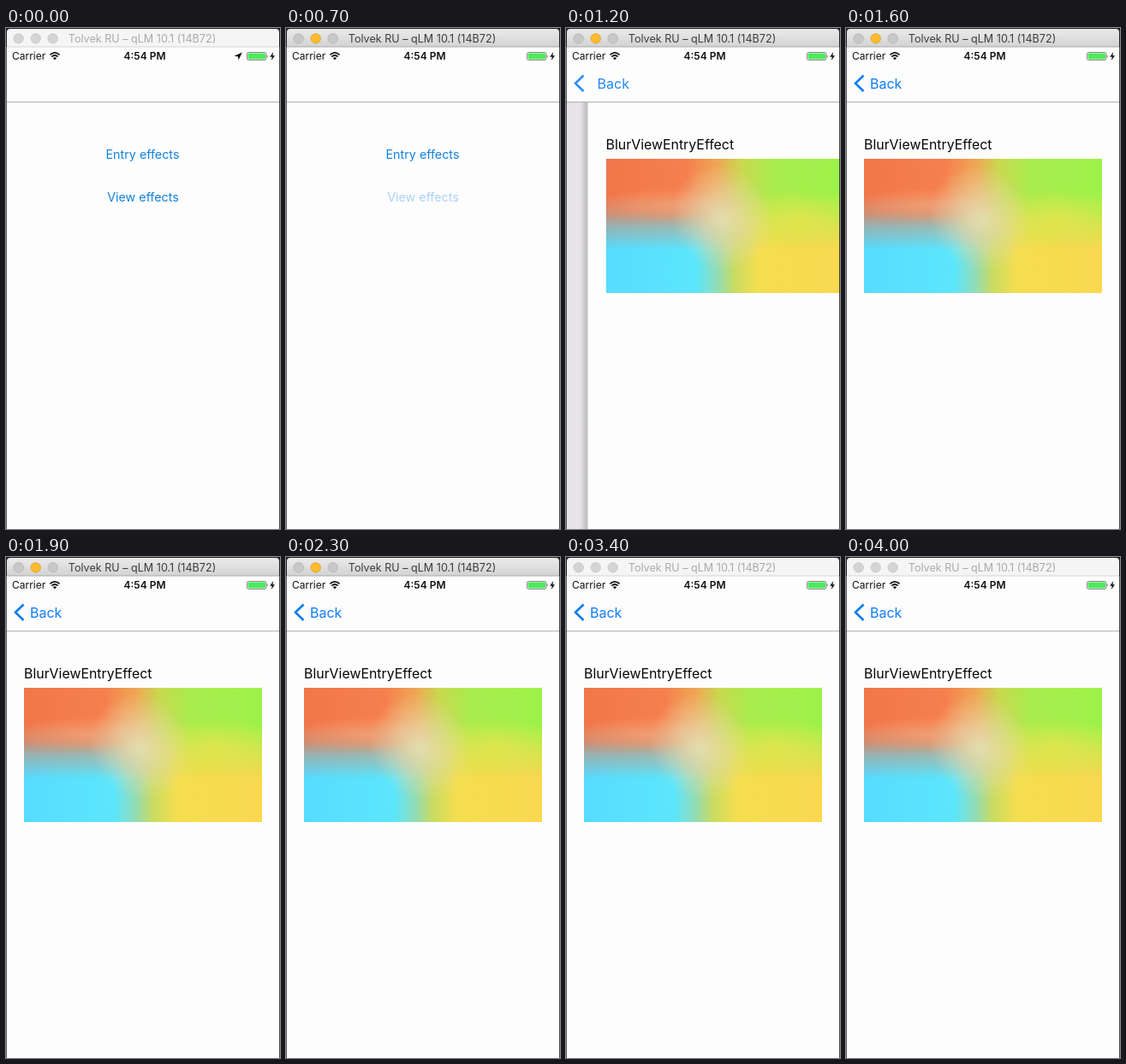
These frames come from a looping animation (320 px wide and 586 px high, 4100 ms). An HTML page:

```html
<!DOCTYPE html>
<html lang="en">
<head>
<meta charset="utf-8">
<title>Page push</title>
<style>
  html, body { margin: 0; width: 100%; height: 100%; overflow: hidden; background: #fff; }
  svg { display: block; width: 320px; height: 586px; font-family: Inter, Roboto, sans-serif; }
</style>
</head>
<body>
<svg viewBox="0 0 320 586">
  <defs>
    <linearGradient id="barOn" x2="0" y2="1"><stop stop-color="#ebebeb"/><stop offset="1" stop-color="#d2d2d2"/></linearGradient>
    <linearGradient id="upper">
      <stop stop-color="#f1764a"/><stop offset=".34" stop-color="#f5804e"/>
      <stop offset=".47" stop-color="#efa654"/><stop offset=".57" stop-color="#c9d950"/>
      <stop offset=".7" stop-color="#a9ec4d"/><stop offset="1" stop-color="#9df24a"/>
    </linearGradient>
    <linearGradient id="lower">
      <stop stop-color="#56dcff"/><stop offset=".38" stop-color="#5ce6fc"/>
      <stop offset=".47" stop-color="#93dcb4"/><stop offset=".54" stop-color="#c8dc62"/>
      <stop offset=".64" stop-color="#f4de4e"/><stop offset="1" stop-color="#fad850"/>
    </linearGradient>
    <linearGradient id="fade" x2="0" y2="1">
      <stop offset=".28" stop-color="#fff"/><stop offset=".4" stop-color="#ccc"/>
      <stop offset=".51" stop-color="#666"/><stop offset=".68" stop-color="#000"/>
    </linearGradient>
    <radialGradient id="glow">
      <stop stop-color="#e6e2b8" stop-opacity=".85"/><stop offset=".45" stop-color="#e8dab4" stop-opacity=".55"/>
      <stop offset="1" stop-color="#ecdcb0" stop-opacity="0"/>
    </radialGradient>
    <radialGradient id="warm">
      <stop stop-color="#f5a67a" stop-opacity=".65"/><stop offset="1" stop-color="#f5a67a" stop-opacity="0"/>
    </radialGradient>
    <radialGradient id="lemon">
      <stop stop-color="#f2e44e" stop-opacity=".6"/><stop offset="1" stop-color="#f2e44e" stop-opacity="0"/>
    </radialGradient>
    <linearGradient id="edge"><stop stop-opacity="0"/><stop offset="1" stop-opacity=".2"/></linearGradient>
    <mask id="upperMask"><rect x="21" y="153" width="278" height="157" fill="url(#fade)"/></mask>
    <clipPath id="frame"><rect x="21" y="153" width="278" height="157"/></clipPath>
  </defs>

  <rect width="320" height="586" fill="#fefdfe"/>

  <g id="menu" font-size="14.3" text-anchor="middle" fill="#1081dc">
    <text x="159.5" y="153.3">Entry effects</text>
    <text id="view" x="160" y="203.3">View effects</text>
  </g>
  <rect id="dim" y="87" width="320" height="499" fill="#140a28"/>

  <g id="page">
    <rect id="shadow" x="-9" y="87" width="9" height="499" fill="url(#edge)"/>
    <rect y="87" width="320" height="499" fill="#fefdfe"/>
    <text x="21" y="142" font-size="15.9" fill="#080808">BlurViewEntryEffect</text>
    <g clip-path="url(#frame)">
      <rect x="21" y="153" width="278" height="157" fill="url(#lower)"/>
      <rect x="21" y="153" width="278" height="157" fill="url(#upper)" mask="url(#upperMask)"/>
      <ellipse cx="92" cy="207" rx="85" ry="20" fill="url(#warm)"/>
      <ellipse cx="245" cy="222" rx="85" ry="34" fill="url(#lemon)"/>
      <ellipse cx="157" cy="222" rx="58" ry="64" fill="url(#glow)" transform="rotate(-35 157 222)"/>
    </g>
  </g>

  <rect y="22" width="320" height="65" fill="#fefdfe"/>
  <path d="M0 86.7H320" stroke="#aaa8ad"/>
  <path id="chevron" d="M20.5 55.5L11 64.8L20.5 74" fill="none" stroke="#0f7df5" stroke-width="2.6"/>
  <text id="back" x="28" y="70.6" font-size="16" fill="#0f7df5">Back</text>

  <g fill="#111">
    <text x="7" y="37.4" font-size="12">Carrier</text>
    <text x="162" y="37.4" font-size="12" font-weight="600" text-anchor="middle">4:54 PM</text>
    <path d="M51.4 31.4Q57 26.4 62.6 31.4M53.4 33.6Q57 30.4 60.6 33.6" fill="none" stroke="#111" stroke-width="1.7"/>
    <path d="M54.9 35.2Q57 33.4 59.1 35.2L57 37.6Z"/>
    <path id="arrow" d="M275.8 28.4L271.6 37.6L271 33.4L266.6 32.8Z"/>
    <rect x="281.5" y="28.5" width="22.5" height="9" rx="1.8" fill="#fff" stroke="#888"/>
    <rect x="282.5" y="29.5" width="20.5" height="7" rx=".8" fill="#4cea5c"/>
    <path d="M304.8 31.2Q306.4 33 304.8 34.8Z"/>
    <path d="M312.3 28L308.2 33.8H310.8L309.8 38.2L314 32.2H311.4Z"/>
  </g>

  <path d="M0 0H320V22H0Z" fill="#222"/>
  <path id="bar" d="M1 22V5Q1 1 5 1H315Q319 1 319 5V22Z"/>
  <path id="barLine" d="M1 22H319"/>
  <g id="lights" stroke-width=".8">
    <circle cx="14.7" cy="12.3" r="5.7"/><circle cx="34.7" cy="12.3" r="5.7"/><circle cx="54.7" cy="12.3" r="5.7"/>
  </g>
  <text id="title" x="159" y="17" font-size="12.6" text-anchor="middle">Tolvek RU – qLM 10.1 (14B72)</text>
  <path d="M.3 22V586M319.6 22V586" stroke="#222" stroke-width=".9"/>
</svg>
<script>
  const LOOP = 4100, STEP = 100, PRESS = 700, PUSH = 900, BLUR = 3200;
  const el = id => document.getElementById(id);
  const set = (node, attrs) => {
    for (const k in attrs) node.setAttribute(k, attrs[k]);
  };
  const clamp = v => Math.max(0, Math.min(1, v));

  // critically damped spring, settled after half a second
  function pushed(t) {
    if (t <= PUSH) return 0;
    if (t >= PUSH + 500) return 1;
    const s = (t - PUSH) * .0139;
    return 1 - (1 + s) * Math.exp(-s);
  }

  function drawWindow(active) {
    set(el('bar'), { fill: active ? 'url(#barOn)' : '#f6f5f6' });
    set(el('barLine'), { stroke: active ? '#aaa' : '#d5d4d5' });
    set(el('title'), { fill: active ? '#3c3c3c' : '#aaa9aa' });
    [...el('lights').children].forEach((c, i) => {
      const lit = active && i === 1;
      set(c, {
        fill: lit ? '#fdbc30' : active ? '#c9c8c9' : '#d5d4d5',
        stroke: lit ? '#dda026' : active ? '#b2b1b2' : '#c5c4c5'
      });
    });
  }

  function draw(t) {
    const p = pushed(t);
    drawWindow(t >= PRESS && t < BLUR);
    set(el('arrow'), { opacity: t < 200 ? 1 : 0 });
    set(el('menu'), { transform: `translate(${-96 * p})` });
    set(el('view'), { opacity: t < PRESS ? 1 : .35 });
    set(el('dim'), { opacity: .11 * p });
    set(el('page'), { transform: `translate(${320 * (1 - p)})`, opacity: p > 0 ? 1 : 0 });
    set(el('shadow'), { opacity: p < 1 ? 1 : 0 });
    set(el('back'), { transform: `translate(${107 * (1 - p)})`, opacity: p });
    set(el('chevron'), { opacity: clamp((p - .38) / .62) });
  }

  const start = performance.now();
  function tick() {
    const t = (performance.now() - start) % LOOP;
    draw(Math.floor(t / STEP) * STEP);
    requestAnimationFrame(tick);
  }
  tick();
</script>
</body>
</html>
```
